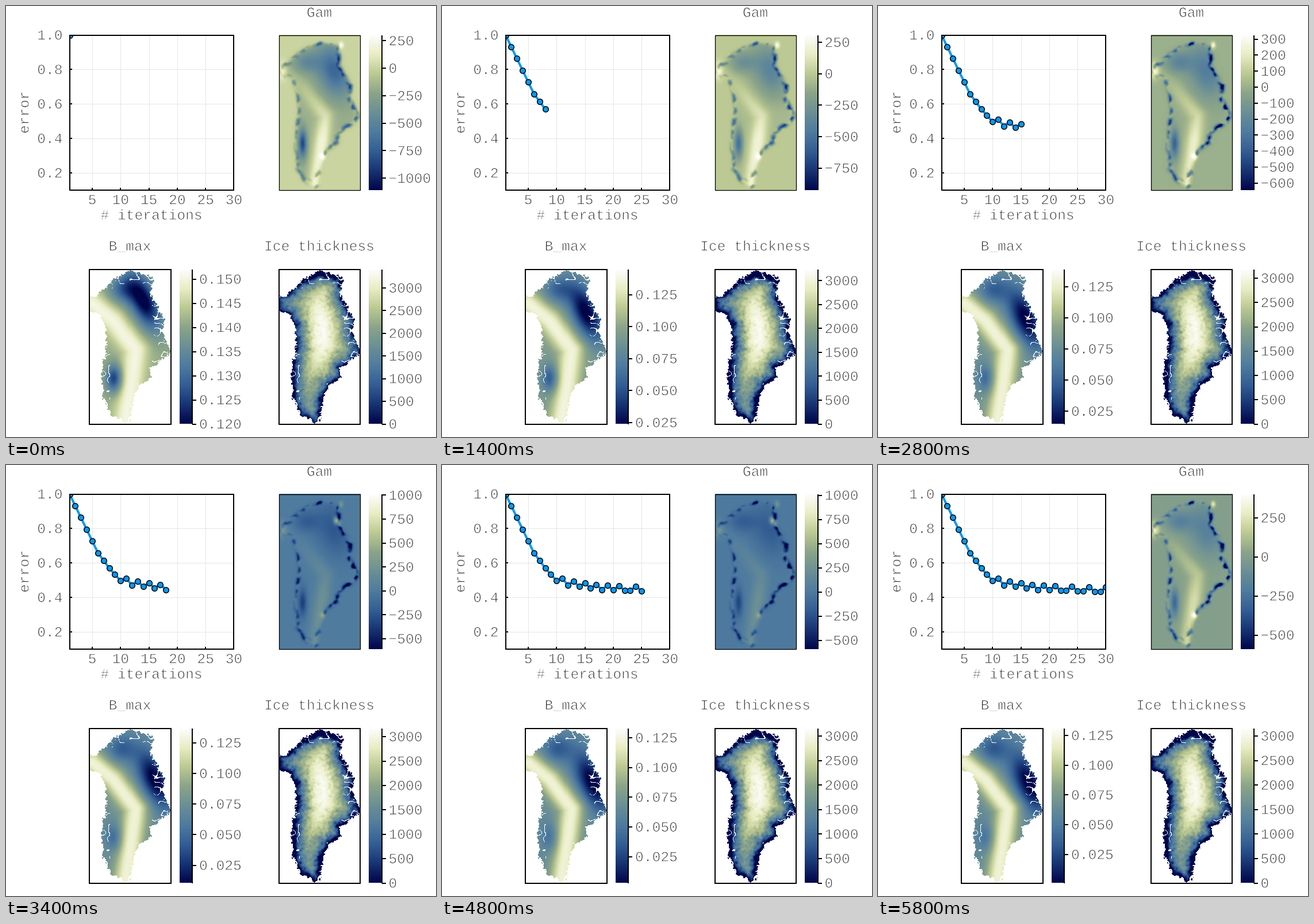
A matplotlib script that plays this animation: 748x749 px, repeating every 6 s.

```python
import numpy as np
import matplotlib.pyplot as plt
from matplotlib.animation import FuncAnimation
from matplotlib.colors import LinearSegmentedColormap
from matplotlib.patches import Rectangle
from matplotlib.patheffects import Stroke
from matplotlib.path import Path

W, H, DPI = 748, 749, 64
PX = 72 / DPI
COUNT = 30
NX, NY = 141, 269
rng = np.random.default_rng(7)

cmap = LinearSegmentedColormap.from_list("ice", [
    "#00054a", "#173474", "#335e93", "#4f7b9f", "#6b8f95",
    "#8ba489", "#bcc993", "#e9edc4", "#fefefe"])

# key points of the outline and of the central ridge, in panel pixels
COAST = [(0, 48), (14, 45), (38, 22), (70, 3), (92, 9), (108, 13), (108, 52),
         (128, 87), (126, 111), (141, 141), (128, 157), (105, 172), (107, 187),
         (85, 202), (73, 232), (70, 264), (63, 267), (40, 254), (26, 235),
         (21, 192), (25, 154), (30, 132), (28, 102), (20, 80), (0, 72)]
RIDGE = [(5, 60), (42, 90), (80, 140), (70, 215), (62, 268)]

gx, gy = np.meshgrid(np.arange(NX) + .5, np.arange(NY) + .5)


def seg_dist(a, b):
    dx, dy = b[0] - a[0], b[1] - a[1]
    t = np.clip(((gx - a[0]) * dx + (gy - a[1]) * dy) / (dx * dx + dy * dy), 0, 1)
    return np.hypot(gx - a[0] - t * dx, gy - a[1] - t * dy)


def path_dist(pts):
    return np.min([seg_dist(a, b) for a, b in zip(pts, pts[1:])], axis=0)


def bump(x, y, a, b, tilt=0):
    """Gaussian hill, a across and b along an axis tilted off the vertical."""
    c, s = np.cos(np.radians(tilt)), np.sin(np.radians(tilt))
    dx, dy = gx - x, gy - y
    return np.exp(-((dx * c - dy * s) / a) ** 2 / 2 - ((dx * s + dy * c) / b) ** 2 / 2)


def noise(scale):
    fx, fy = np.fft.fftfreq(NX), np.fft.fftfreq(NY)[:, None]
    spec = np.fft.fft2(rng.normal(size=(NY, NX)))
    out = np.fft.ifft2(spec * np.exp(-20 * scale ** 2 * (fx ** 2 + fy ** 2))).real
    return out / out.std()


# ---- geography ----
inside = Path(COAST).contains_points(np.c_[gx.ravel(), gy.ravel()])
shore = path_dist(COAST + COAST[:1]) * np.where(inside.reshape(gx.shape), 1, -1)
shore = np.where(inside.reshape(gx.shape), np.minimum(shore, gx + 8), shore)
land = shore + 1.4 * noise(.9) + noise(3) > 0
rocky = (gy < 34) | (gx > 108) | ((gx < 36) & (gy > 135))
land &= ~((abs(noise(4)) < .14) & (shore < 15) & rocky)

inset = 3 + 9 * bump(75, 0, 50, 16) + 4 * bump(22, 190, 15, 45)
depth = shore - inset
grain, patch = noise(1.5), noise(3)
spine = path_dist(RIDGE)

soft = 1 / (1 + np.exp(-depth / 1.8))
rim = np.exp(-((depth - 2) / 4) ** 2) * np.clip(.5 + .8 * patch, 0, 1.8)
rim *= .7 + .6 * gx / NX
glow = np.exp(-(spine / 13) ** 2) * np.clip((gy - 60) / 120, .2, 1)
sparks = bump(107, 18, 3, 4) + bump(6, 62, 5, 10) + bump(75, 210, 3, 4)
spike = bump(100, 48, 3.5, 5, 25)


def pulse(k):
    return np.clip((k - 14) / 3, 0, 1) * np.clip((29 - k) / 5, 0, 1)


def gam_field(k):
    w = np.exp(-k / 8)
    v = 20 - 190 * w + (200 + 160 * w) * glow
    v -= (190 + 340 * w) * bump(95, 62, 20, 32, 15)
    v -= (180 + 90 * w) * bump(48, 48, 16, 13)
    v -= (300 + 380 * w) * bump(41, 188, 5, 17)
    return v * soft - (340 - 60 * w) * rim + 260 * sparks + 800 * pulse(k) * spike


def acc_field(k):
    p = 1 - np.exp(-k / 12)
    v = .66 - .21 * p + (.28 + .18 * p) * np.exp(-(spine / 21) ** 2)
    v -= (.7 - .22 * p) * bump(93 + 26 * p, 55 + 45 * p, 17, 38, 24)
    v -= (.3 - .08 * p) * bump(56, 36, 17, 16)
    return v - (.52 - .4 * p) * bump(43, 190, 10, 17)


def ice_field(k):
    s = depth * (1 + .09 * grain) + .8 * grain + 1.2 * patch + 2.5 * np.exp(-k / 2)
    v = 1 - np.exp(-np.maximum(s, 0) / 13)
    return v * (.7 + .31 * bump(73, 108, 22, 60))


# ---- colour ranges and error over the iterations ----
def gam_range(k):
    lo = -590 - 540 / (1 + np.exp(.385 * (k - 8.27)))
    hi = 302 + .12 * k * k
    return lo, hi + (1012 - hi) * pulse(k)


def acc_range(k):
    lo = .001 + .013 * (1 + np.cos(np.pi * k / 29)) + .093 * np.exp(-k / 1.3)
    return lo, .152 - .00114 * k + 1.41e-5 * k * k


def ice_range(k):
    return 0, 3150 + 257 * np.exp(-k / 6.3)


def error(k):
    """Falling trend, then a zigzag of period two and later three."""
    trend = np.interp(k, [0, 5, 7, 9, 11, 17, 29],
                      [1, .659, .57, .497, .472, .445, .433])
    high = np.where(k <= 20, k % 2 == 0, (k - 20) % 3 == 0)
    return trend + .026 * (high & (k > 9))


def paint(v, mask=True):
    rgba = cmap(np.clip(v, 0, 1))
    rgba[..., 3] = mask
    return rgba


# ---- stage ----
fig = plt.figure(figsize=(W / DPI, H / DPI), dpi=DPI, facecolor="white")
ax = fig.add_axes((0, 0, 1, 1))
ax.set_xlim(0, W)
ax.set_ylim(H, 0)
ax.axis("off")
THIN = [Stroke(linewidth=.85 * PX, foreground="white")]


def text(x, y, s, ha="center", rot=0):
    return ax.text(x, y, s, ha=ha, va="baseline", rotation=rot,
                   rotation_mode="anchor", family="Liberation Mono",
                   size=24.6 * PX, color="#383838", path_effects=THIN)


def line(xs, ys, w=2, color="black", z=5):
    return ax.plot(xs, ys, color=color, lw=w * PX, zorder=z,
                   solid_capstyle="butt")[0]


def box(x0, y0, x1, y1, w=2):
    ax.add_patch(Rectangle((x0, y0), x1 - x0, y1 - y0, fill=False,
                           ec="black", lw=w * PX, zorder=6))


class Panel:
    """Map with a colour bar whose ticks follow the range."""

    def __init__(self, x, y0, y1, title, base, w=2):
        self.y0, self.y1, self.bar = y0, y1, x + 179
        self.img = ax.imshow(np.ones((NY, NX, 4)), extent=(x, x + 141.5, y1, y0),
                             aspect="auto", interpolation="nearest", zorder=1)
        ax.imshow(cmap(np.linspace(1, 0, 256))[:, None],
                  extent=(x + 156.5, x + 178.5, y1, y0), aspect="auto", zorder=1)
        box(x, y0, x + 141.5, y1, w)
        line([self.bar] * 2, [y0, y1])
        text(x + 70, base, title)
        self.marks = []

    def show(self, field, lo, hi, step, fmt, mask=True):
        self.img.set_data(paint(field, mask))
        for m in self.marks:
            m.remove()
        self.marks = []
        first, last = np.ceil(lo / step - 1e-6), np.floor(hi / step + 1e-6)
        for v in np.arange(first, last + 1) * step:
            y = self.y1 - (v - lo) / (hi - lo) * (self.y1 - self.y0)
            label = format(v + 0.0, fmt).replace("-", "\u2212")
            self.marks += [line([self.bar, self.bar + 7], [y, y]),
                           text(self.bar + 11.5, y + 8, label, "left")]


gam = Panel(475, 50.5, 320, "Gam", 19, 1.3)
acc = Panel(145.5, 458, 726.5, "B_max", 425)
ice = Panel(475, 458, 726.5, "Ice thickness", 425)

# ---- error plot ----
X0, X1, Y0, Y1 = 110.6, 396.4, 50.5, 320


def ex(n):
    return X0 + (n - 1) / 29 * (X1 - X0)


def ey(e):
    return Y0 + (1 - e) / .9 * (Y1 - Y0)


for n in range(5, 31, 5):
    line([ex(n)] * 2, [Y0, Y1], 1, "#e6e6e6", 1)
    line([ex(n)] * 2, [Y1, Y1 - 4])
    text(ex(n), 344.5, str(n))
for e in (.2, .4, .6, .8, 1):
    line([X0, X1], [ey(e)] * 2, 1, "#e6e6e6", 1)
    line([X0, X0 + 4], [ey(e)] * 2)
    text(98.5, ey(e) + 8, f"{e:.1f}", "right")
box(X0, Y0, X1, Y1)
text(253, 371, "# iterations")
text(39.5, 185, "error", rot=90)

curve = line([], [], 4, "#009afa", 4)
curve.set(marker="o", markersize=9.6 * PX, markerfacecolor="#009afa",
          markeredgecolor="black", markeredgewidth=1.5 * PX)
curve.set_clip_path(Path([(X0, Y0), (X1, Y0), (X1, Y1), (X0, Y1), (X0, Y0)]),
                    ax.transData)


def draw(k):
    n = np.arange(k + 1)
    curve.set_data(ex(n + 1), ey(error(n)))

    lo, hi = gam_range(k)
    step = 100 if hi - lo < 990 else 250
    gam.show((gam_field(k) - lo) / (hi - lo), lo, hi, step, ".0f")

    lo, hi = acc_range(k)
    step = .005 if hi - lo < .05 else .01 if hi - lo < .095 else .025
    acc.show(acc_field(k), lo, hi, step, ".2f" if step == .01 else ".3f", land)

    lo, hi = ice_range(k)
    ice.show(ice_field(k), lo, hi, 500, ".0f", land)
    return []


anim = FuncAnimation(fig, draw, frames=COUNT, interval=200, repeat=True,
                     repeat_delay=0, init_func=lambda: [], blit=False)
plt.show()
```
